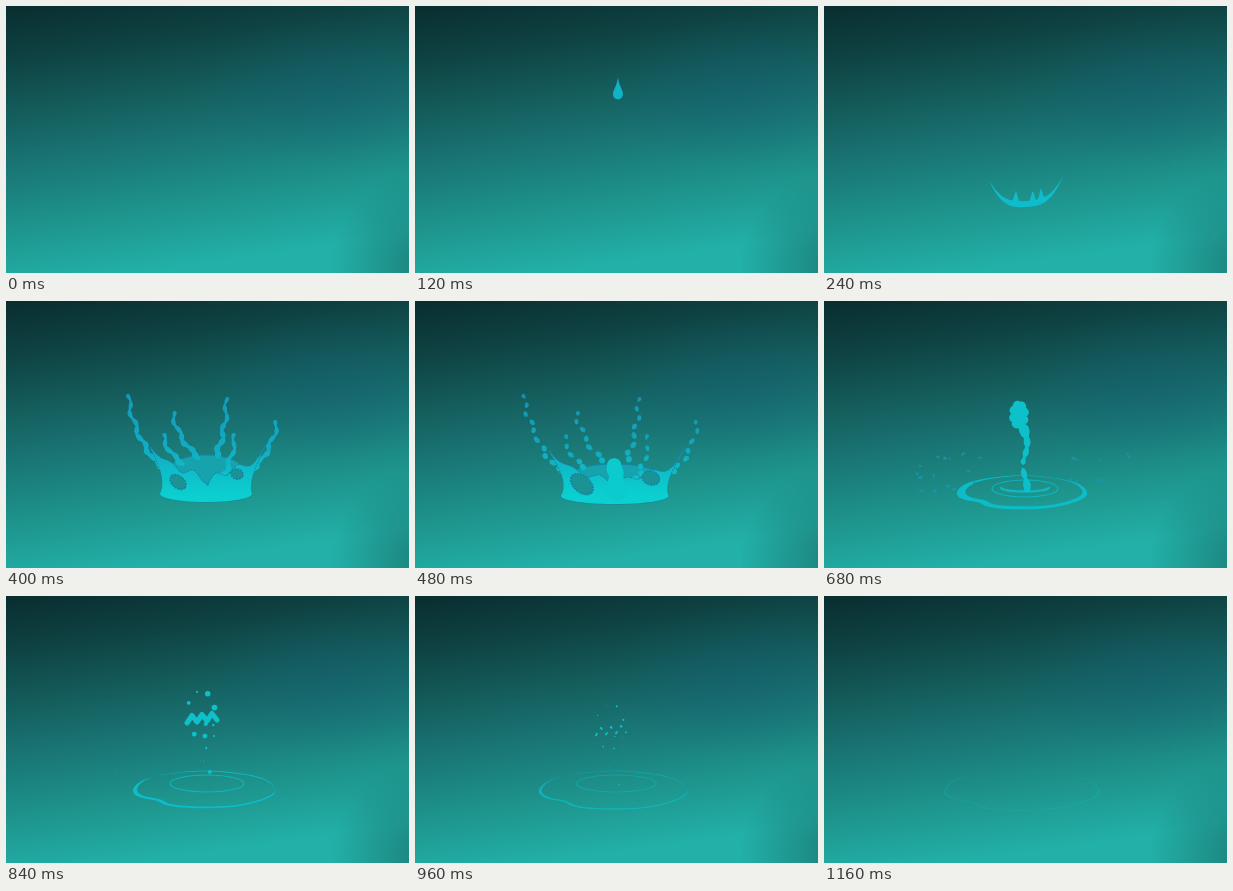
Animation of 403x267 px, one loop 1.2 s. Source, as an HTML page with a canvas:

```html
<!DOCTYPE html>
<html lang="en">
<head>
<meta charset="utf-8">
<title>Water splash</title>
<style>
html, body { margin: 0; width: 100%; height: 100%; overflow: hidden; }
body {
  background:
    radial-gradient(circle 95px at 420px 258px, rgba(26,116,110,.62) 20%, transparent),
    radial-gradient(ellipse 130px 75px at 325px 85px, rgba(18,92,118,.32), transparent),
    linear-gradient(172deg, #092d2f, #0f4444 18%, #156261 37%, #197473 49%, #1e978f 71%, #22b0a8 88%);
}
canvas { display: block; }
</style>
</head>
<body>
<canvas id="stage" width="403" height="267"></canvas>
<script>
const ctx = document.getElementById('stage').getContext('2d');
const LOOP = 1200, STEP = 40, CX = 202, CY = 198, TAU = Math.PI * 2;
const EDGE = '#1584a4', HOLLOW = '#1b9294', JET = '#0dc0ca';

const water = ctx.createLinearGradient(0, 95, 0, 195);
water.addColorStop(0, '#1599b8');
water.addColorStop(.55, '#11adc4');
water.addColorStop(1, '#0bd0cf');

// Crown arms: tip x, y and base x, y
const ARMS = [
  [122, 95, 156, 166], [157, 134, 178, 163], [167, 112, 194, 157],
  [221, 98, 210, 155], [229, 134, 215, 178], [271, 121, 242, 172]
];

const lerp = (a, b, k) => a + (b - a) * k;
const clamp = v => Math.min(1, Math.max(0, v));
const rand = n => { const v = Math.sin(n * 91.7 + 3.1) * 4375.5; return v - Math.floor(v); };
// n + 1 evenly spaced samples of f over a..b
const sample = (n, a, b, f) => Array.from({ length: n + 1 }, (_, i) => f(lerp(a, b, i / n), i));

function dot(x, y, r) {
  if (r <= 0) return;
  ctx.beginPath();
  ctx.arc(x, y, r, 0, TAU);
  ctx.fill();
}

function oval(x, y, rx, ry, tilt = 0, from = 0, to = TAU) {
  ctx.beginPath();
  ctx.ellipse(x, y, rx, ry, tilt, from, to);
}

function path(points) {
  ctx.beginPath();
  points.forEach(p => ctx.lineTo(...p));
}

function outline() {
  ctx.strokeStyle = EDGE;
  ctx.lineWidth = 1.6;
  ctx.setLineDash([2, 1]);
  ctx.stroke();
  ctx.setLineDash([]);
}

function drop(t) {
  const s = (t - 80) / 40, y = 32 + 48 * s + 4 * s * s;
  ctx.fillStyle = '#12b2c6';
  ctx.beginPath();
  ctx.moveTo(203, y - 13);
  ctx.bezierCurveTo(204, y - 4, 208, y, 208, y + 4);
  ctx.bezierCurveTo(208, y + 11, 198, y + 11, 198, y + 4);
  ctx.bezierCurveTo(198, y, 202, y - 4, 203, y - 13);
  ctx.fill();
}

// First contact: a crescent with three small spikes
function cup(t) {
  const size = t < 240 ? .5 : 1;
  const at = (s, y) => [CX + 37.5 * s * size, CY + (y - 2 * s - CY) * size];
  const spike = s => [-.27, .18, .4].reduce((sum, c) => sum + Math.max(0, 1 - Math.abs(s - c) / .08), 0);
  path([
    ...sample(60, -1, 1, s => at(s, 195 - 24 * Math.abs(s) ** 3 - 11 * spike(s))),
    ...sample(30, 1, -1, s => at(s, 201 - 30 * Math.abs(s) ** 3))
  ]);
  ctx.fillStyle = '#0fbccd';
  ctx.fill();
}

// The opened crown widens while its upper wall sinks
function spread(x, y, k) {
  const sink = .24 * Math.max(0, 190 - y) * clamp((y - 130) / 40);
  return [CX + (x - CX) * (1 + .17 * k), y + sink * k];
}

function arm([tx, ty, bx, by], n, k) {
  const split = Math.min(k, 1), late = Math.max(0, k - 1);
  const count = Math.round(Math.hypot(tx - bx, ty - by) / 1.5);
  const cx = lerp(tx, bx, .2), cy = lerp(ty, by, .65);
  sample(count, 0, 1, (f, i) => {
    const wave = Math.cos(i * 1.18);
    const x = lerp(lerp(tx, cx, f), lerp(cx, bx, f), f) + 1.8 * Math.sin(i * .45 + n);
    const y = lerp(lerp(ty, cy, f), lerp(cy, by, f), f);
    const [px, py] = spread(x, y, k);
    const r = 1.6 + f - 1.2 * split + (.5 + 1.2 * split) * wave - .4 * late;
    if (py < 192) dot(px, py + 9 * late * late, r);
  });
}

function wall(k) {
  const top = sample(48, -1, 1, s => {
    const a = Math.abs(s);
    return spread(CX + 46 * s + 12 * s ** 9, 183 - 20 * a ** .6 - 20 * a ** 12 + 3.5 * Math.cos(s * 13 + 1), k);
  });
  const foot = sample(24, 0, Math.PI, a => spread(200 + 46 * Math.cos(a), 193 + 8 * Math.sin(a) + 2 * k, k));
  ctx.beginPath();
  top.forEach(p => ctx.lineTo(...p));
  ctx.quadraticCurveTo(...spread(241, 178, k), ...foot[0]);
  foot.forEach(p => ctx.lineTo(...p));
  ctx.quadraticCurveTo(...spread(162, 178, k), ...top[0]);
}

function crown(t) {
  const p = clamp((t - 200) / 200), k = Math.max(0, (t - 400) / 80), whole = k <= 1;
  ctx.save();
  ctx.translate(CX, CY);
  ctx.scale(p ** .43, p ** .8);
  ctx.translate(-CX, -CY);
  if (whole) {
    oval(...spread(200, 169, k), 37 + 6 * k, 15 - 4 * k);
    ctx.fillStyle = '#17a3ad';
    ctx.fill();
    outline();
  }
  ctx.fillStyle = water;
  ctx.globalAlpha = 1 - .15 * Math.min(k, 1);
  ARMS.forEach((a, n) => arm(a, n, k));
  ctx.globalAlpha = 1;
  if (whole) {
    wall(k);
    outline();
    ctx.fillStyle = water;
    ctx.fill();
    ctx.fillStyle = HOLLOW;
    for (const [x, y, rx, ry, tilt] of [[172, 181, 9, 6, .7], [231, 173, 6, 5, .3]]) {
      oval(...spread(x, y, k), rx * (1 + .45 * k), ry * (1 + .35 * k), tilt);
      ctx.fill();
      outline();
    }
  }
  ctx.restore();
}

function rim(x, y, rx, ry) {
  sample(90, 0, TAU, (a, i) => {
    const r = 1 - .1 * Math.exp(-(((a - 2.42) / .22) ** 2)) + .008 * Math.sin(a * 7);
    ctx[i ? 'lineTo' : 'moveTo'](x + rx * r * Math.cos(a), y + ry * r * Math.sin(a));
  });
}

function rings(t) {
  const rx = 82 - 29 * Math.exp((480 - t) / 370), ry = rx * .26;
  const hole = .98 - Math.exp((480 - t) / 80);
  const late = clamp((t - 840) / 320), y = 191.5 + 3 * clamp((t - 680) / 200);
  ctx.globalAlpha = 1 - .65 * late;
  ctx.fillStyle = '#0cbcc8';
  ctx.beginPath();
  rim(198, y, rx, ry);
  rim(198 + 2 * (1 - late), y - lerp(1.2, .3, late), rx * hole, ry * hole);
  ctx.fill('evenodd');

  ctx.strokeStyle = '#0fb8c3';
  ctx.lineWidth = 1.2;
  ctx.globalAlpha = .9 * clamp((t - 560) / 80) * clamp((1080 - t) / 220);
  oval(201, 187.5, 33 + (t - 680) / 40, 8.5);
  ctx.stroke();
  ctx.lineWidth = 2.4;
  ctx.globalAlpha = clamp((t - 560) / 80) * clamp((800 - t) / 100);
  oval(201, 186.5, 24, 4, 0, .1, 3.04);
  ctx.stroke();
  ctx.globalAlpha = 1;
}

// A dome that rises into a stem with a lobed head, then breaks into drops
function jet(t) {
  const p = clamp((t - 440) / 240), rise = 1 - (1 - p) ** 2;
  const k = clamp((t - 680) / 160), after = Math.max(0, (t - 840) / 160);
  const fall = 22 * after * after, shrink = Math.max(0, 1 - .85 * after);
  const lift = y => 190 - (190 - y) * rise + fall;
  ctx.fillStyle = ctx.strokeStyle = t < 560 ? '#0bcbce' : JET;

  sample(40, 128, 188, (y, i) => {
    const thick = 2 + 3 * Math.exp((128 - y) / 9) + 2.5 * Math.exp((y - 190) / 7) + .7 * Math.sin(i * .9);
    const gap = 4 * Math.exp(-(((y - 164.5) / 2) ** 2));
    const bead = i % 8 ? 0 : 2.2 * k * rand(i);
    const x = 201 + 2.2 * Math.sin((y - 132) / 7) * p + 5 * k * Math.sin(i);
    dot(x, lift(y), Math.max((thick - gap) * (1 - 1.4 * k), bead) * shrink + (1 - p) * lerp(3, 9, (y - 128) / 60));
  });

  const r = i => lerp(4.6, 1 + 1.9 * rand(i + 4), k) * shrink + (1 - p) * 2.5;
  for (let i = 0; i < 8; i++) {
    const a = i / 8 * TAU + .5;
    const x = lerp(200, 195, p) + lerp(5.5 * p, 14, k) * Math.cos(a);
    dot(x, lift(lerp(114, 118, k) + lerp(10, 23, k) * Math.sin(a)), r(i));
  }
  dot(lerp(200, 195, p), lift(114), 6 * (1 - 1.5 * k));

  if (shrink <= 0) return;
  path(sample(6, -15, 15, (x, i) => [196 + x * k, lift(122 - x * .1 + (i % 2 ? -3.5 : 3.5) * k)]));
  ctx.lineWidth = 5 * shrink * p;
  ctx.lineJoin = ctx.lineCap = 'round';
  ctx.setLineDash(after ? [5 * shrink, 9 * after] : []);
  ctx.stroke();
  ctx.setLineDash([]);
}

function specks(t) {
  ctx.fillStyle = '#1499ad';
  ctx.globalAlpha = .85 * clamp((880 - t) / 160);
  for (let i = 0; i < 26; i++) {
    const side = i % 5 < 3 ? -1 : 1, reach = 42 + 68 * rand(i);
    const y = 150 + 40 * rand(i + 50) + (t - 680) * .12;
    oval(CX + side * reach * (1 + (t - 680) / 4000), y, 1 + 1.4 * rand(i + 90), .8 + rand(i + 70));
    ctx.fill();
  }
  ctx.globalAlpha = 1;
}

function draw() {
  const t = Math.floor(performance.now() % LOOP / STEP) * STEP;
  ctx.clearRect(0, 0, 403, 267);
  if (t >= 80 && t < 200) drop(t);
  if (t >= 200 && t < 280) cup(t);
  if (t >= 520) rings(t);
  if (t >= 280 && t <= 600) crown(t);
  if (t >= 480) jet(t);
  if (t >= 640) specks(t);
  requestAnimationFrame(draw);
}
draw();
</script>
</body>
</html>
```
